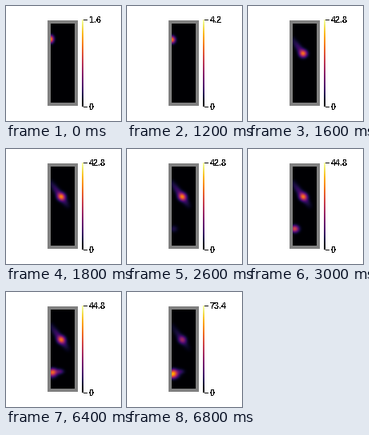
Write a matplotlib script that moves like this. It is 144 by 144 pixels and loops after 8 s.

```python
import numpy as np
import matplotlib.pyplot as plt
from matplotlib.animation import FuncAnimation
from matplotlib.patches import Rectangle

plt.rcParams.update({"text.antialiased": False, "text.hinting": "default",
                     "text.hinting_factor": 1})
SIZE, STEP, FRAMES = 144, 200, 40
LEFT, RIGHT, TOP, BOTTOM = 56, 86, 22, 121

# colour-scale maximum, keyed by the step where it takes over
SCALES = {0: 1.6, 6: 4.2, 7: 16.3, 8: 42.8, 15: 44.8, 33: 58.6, 34: 73.4}

X, Y = np.meshgrid(np.arange(LEFT, RIGHT) + 0.5, np.arange(TOP, BOTTOM) + 0.5)


def bump(x, y, height, sx=3.0, sy=3.0):
    return height * np.exp(-(((X - x) / sx) ** 2 + ((Y - y) / sy) ** 2) / 2)


def ramp(step, start, end):
    return np.clip((step - start) / (end - start), 0, 1) ** 1.5


def streak(step):
    """Diagonal trail that runs in from the wall, hottest past its middle."""
    reach = (step - 5.6) / 3.4
    total = bump(LEFT, 41.5, 1.15, 2.7, 3.3)
    for s in np.linspace(0, 1, 8):
        if s <= reach:
            total += bump(56.5 + 21 * s, 42.5 + 29 * s, 6 * np.sin(np.pi * (0.1 + 0.8 * s)))
    if reach > 0.58:
        total += bump(69.3, 59.7, 23, 3.5, 3.3)
    return total


def jet(step):
    """Lower spot that grows, throws a tail and then heats up at the wall."""
    total = bump(58.5, 100, 25 * ramp(step, 12, 15), 3.7, 3.1)
    total += bump(67.5, 99.5, 10 * ramp(step, 30, 31), 3.5, 2.4)
    return total + bump(56.7, 103.7, 46 * ramp(step, 31, 34), 4.8, 3.3)


def field(step):
    return streak(step) + jet(step)


def scale(step):
    return SCALES[max(k for k in SCALES if k <= step)]


fig = plt.figure(figsize=(SIZE / 72, SIZE / 72), dpi=72, facecolor="white")
ax = fig.add_axes([0, 0, 1, 1])
ax.axis("off")

ax.add_patch(Rectangle((52, 18), 38, 107, fc="#808080", ec="none", antialiased=False))
heat = ax.imshow(field(0), cmap="inferno", vmin=0, vmax=1.6, interpolation="nearest",
                 extent=(LEFT, RIGHT, BOTTOM, TOP), zorder=2)
ax.imshow(np.linspace(1, 0, 109)[:, None], cmap="inferno", interpolation="nearest",
          extent=(95, 97, 126, 17), zorder=2)


def tick(y, text):
    ax.add_patch(Rectangle((97, y), 5, 1, fc="black", ec="none", antialiased=False))
    return ax.text(104, y + 4, text, family="Liberation Sans", weight="bold",
                   size=11, va="baseline", ha="left")


label = tick(17, "1.6")
tick(126, "0")
ax.set(xlim=(0, SIZE), ylim=(SIZE, 0), aspect="auto")


def update(step):
    top = scale(step)
    heat.set_data(field(step))
    heat.set_clim(0, top)
    label.set_text(f"{top:.1f}")
    return heat, label


anim = FuncAnimation(fig, update, frames=FRAMES, interval=STEP, repeat=True, repeat_delay=0)
plt.show()
```
